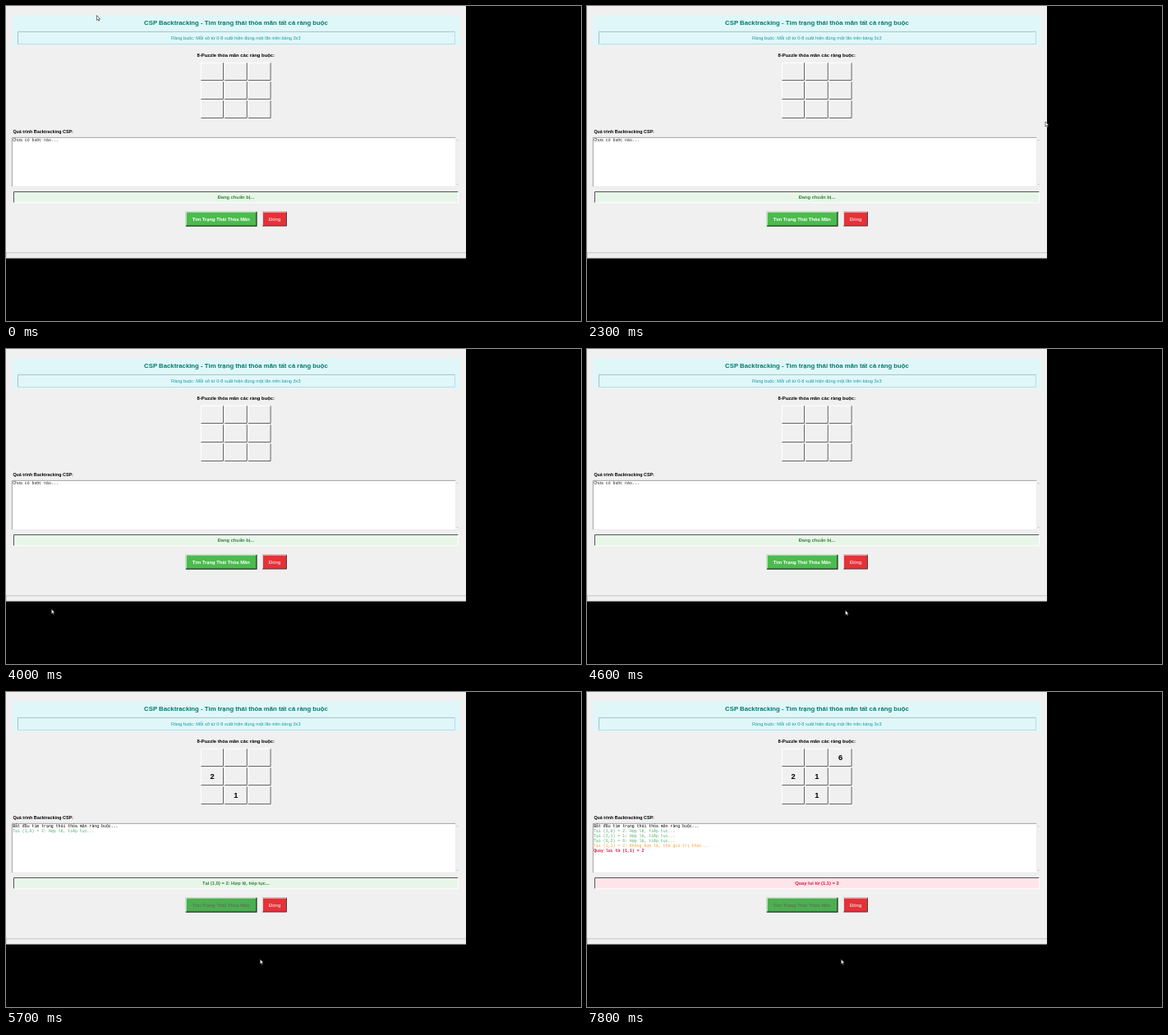
Recreate the animation shown at these times as an HTML page. Size 700 by 384 pixels, loop 8000 ms.

```html
<!DOCTYPE html>
<html lang="vi">
<head>
<meta charset="utf-8">
<style>
html, body { margin: 0; height: 100%; overflow: hidden; background: #000; }
svg { display: block; width: 100vw; height: 100vh; }
text { font-family: "Liberation Sans", Arial, sans-serif; white-space: pre; }
.bold { font-weight: bold; }
.mono { font-family: "Liberation Mono", "Courier New", monospace; }
.mid { text-anchor: middle; }
</style>
</head>
<body>
<svg id="stage" viewBox="0 0 700 384" preserveAspectRatio="none"></svg>
<script>
const LOOP = 8000, STEP = 100;
const stage = document.getElementById('stage');

function add(tag, attrs, content) {
  const el = document.createElementNS('http://www.w3.org/2000/svg', tag);
  for (const key in attrs) el.setAttribute(key, attrs[key]);
  if (content) el.textContent = content;
  stage.appendChild(el);
  return el;
}
const rect = (x, y, width, height, fill) => add('rect', { x, y, width, height, fill });
const line = (d, stroke, width = 1) => add('path', { d, stroke, 'stroke-width': width, fill: 'none' });
const label = (content, x, y, size, fill, cls) =>
  add('text', { x, y, 'font-size': size, fill, class: cls }, content);

// Box with one colour on its top and left edges, another on the bottom and right.
function bevel(x, y, w, h, fill, light, dark, width = 1) {
  const k = width / 2, r = x + w - k, b = y + h - k;
  return {
    body: rect(x, y, w, h, fill),
    light: line(`M${x + k} ${b}V${y + k}H${r}`, light, width),
    dark: line(`M${x + k} ${b}H${r}V${y + k}`, dark, width)
  };
}

// Window and header
rect(0, 0, 560, 307.5, '#f0f0f0');
rect(7.5, 11, 545.5, 37, '#e0f7fa');
bevel(14.2, 31, 532.6, 15.8, '#e0f7fa', '#8fa9ac', '#b4cdd0', 0.7);
label('CSP Backtracking - Tìm trạng thái thỏa mãn tất cả ràng buộc', 280, 22.7, 7.77, '#00796b', 'bold mid');
label('Ràng buộc: Mỗi số từ 0-8 xuất hiện đúng một lần trên bảng 3x3', 279.8, 41, 5.62, '#1799a3', 'mid');

// Board
label('8-Puzzle thỏa mãn các ràng buộc:', 279.8, 62.1, 5.86, '#000', 'bold mid');
const cells = [];
for (let i = 0; i < 9; i++) {
  const x = 237 + (i % 3) * 28.8, y = 68.8 + Math.floor(i / 3) * 23;
  bevel(x, y, 28, 22.2, '#f0f0f0', '#fff', '#666');
  cells.push(label('', x + 14, y + 14.4, 9.4, '#000', 'bold mid'));
}

// Log
label('Quá trình Backtracking CSP:', 8.4, 155, 5.38, '#000', 'bold');
bevel(7, 160, 541, 60.8, '#fff', '#8c8c8c', '#e3e3e3', 0.8);
rect(547.5, 160, 4.5, 60.8, '#f0f0f0');
line('M548.6 164.2l1-1l1 1M548.6 216.8l1 1l1-1', '#8a8a8a', 0.5);
const logRows = Array.from({ length: 6 }, (_, i) =>
  label('', 8.2, 165.4 + i * 5.87, 4.87, '#000', 'mono'));

// Status bar
const statusBox = bevel(9, 226, 542, 14.3, '#e8f5e9', '#555', '#fff');
const statusText = label('', 279.9, 235.1, 5.75, '#2e7d32', 'bold mid');

// Buttons
const find = bevel(218.5, 250.3, 87, 18.4, '#4cbb4f', '#e8f3e8', '#333', 1.2);
const findText = label('Tìm Trạng Thái Thỏa Mãn', 261.8, 261.6, 5.82, '#fff', 'bold mid');
bevel(312, 250.6, 30, 17.8, '#e53238', '#f6d5d5', '#444');
label('Đóng', 327.1, 261.5, 5.95, '#fff', 'mid');

// Lower frame
line('M0 300.8H560M0.3 300V307', '#b9b9b9', 0.8);
line('M0 307H560M559.6 301V307', '#d8d8d8', 0.6);

// Pointers
const arrow = add('path', {
  d: 'M0 0V5.9L1.4 4.7L2.3 6.7L3.2 6.3L2.3 4.3H4.1Z',
  fill: '#fff', stroke: '#222', 'stroke-width': 0.6
});
const beam = add('path', {
  d: 'M-1.4 -3.2H1.4M0 -3.2V3.2M-1.4 3.2H1.4',
  stroke: '#333', 'stroke-width': 0.7, fill: 'none'
});

// Pointer stops: time, x, y
const route = [
  [400, 110.5, 11.5], [500, 122, 16], [700, 212, 46], [900, 365, 84],
  [1100, 512, 116], [1200, 545.5, 124.5], [1300, 556, 132.5], [1700, 558, 141],
  [2500, 558, 141], [2700, 175, 255.5], [3000, 175, 255.5], [3200, 130, 290],
  [3400, 50, 345], [3600, 3, 378], [3700, 3, 378], [3800, 14, 360],
  [4000, 55.3, 317], [4200, 150, 310], [4400, 277, 316], [4500, 310, 318],
  [4600, 314.5, 318.5], [4900, 309.3, 325.8]
];

function pointerAt(t) {
  const next = route.findIndex(stop => stop[0] > t);
  if (next < 0) return route[route.length - 1].slice(1);
  if (next === 0) return route[0].slice(1);
  const [t0, x0, y0] = route[next - 1], [t1, x1, y1] = route[next];
  const k = (t - t0) / (t1 - t0);
  return [x0 + (x1 - x0) * k, y0 + (y1 - y0) * k];
}

const valid = (place, n) => `Tại (${place}) = ${n}: Hợp lệ, tiếp tục...`;
const GREEN = '#4caf6a', RED = '#d8163f';

// Search events: board, log and status change together.
const events = [
  { at: 0, status: 'Đang chuẩn bị...' },
  { at: 5200, cell: [3, 2], status: 'Đang tìm trạng thái thỏa mãn ràng buộc...',
    log: [['Bắt đầu tìm trạng thái thỏa mãn ràng buộc...', '#000']] },
  { at: 5700, cell: [7, 1], status: valid('1,0', 2), log: [[valid('1,0', 2), GREEN]] },
  { at: 6300, cell: [2, 6], status: valid('2,1', 1), log: [[valid('2,1', 1), GREEN]] },
  { at: 6800, cell: [4, 2], status: valid('0,2', 6), log: [[valid('0,2', 6), GREEN]] },
  { at: 7300, cell: [4, ''], status: 'Quay lui từ (1,1) = 2', failed: true,
    log: [['Tại (1,1) = 2: Không hợp lệ, thử giá trị khác...', '#ff9c33'],
          ['Quay lui từ (1,1) = 2', RED, true]] },
  { at: 7800, cell: [4, 1] }
];

function paintSearch(t) {
  const board = Array(9).fill('');
  let rows = [], status;
  for (const e of events.filter(e => e.at <= t)) {
    if (e.cell) board[e.cell[0]] = e.cell[1];
    if (e.log) rows = rows.concat(e.log);
    if (e.status) status = e;
  }
  if (!rows.length) rows = [['Chưa có bước nào...', '#222']];
  cells.forEach((cell, i) => { cell.textContent = board[i]; });
  logRows.forEach((row, i) => {
    const [content, color, bold] = rows[i] || ['', '#000'];
    row.textContent = content;
    row.setAttribute('fill', color);
    row.setAttribute('class', bold ? 'mono bold' : 'mono');
  });
  statusText.textContent = status.status;
  statusText.setAttribute('fill', status.failed ? RED : '#2e8535');
  statusBox.body.setAttribute('fill', status.failed ? '#ffe4ea' : '#e8f5e9');
}

function paintButton(t) {
  const pressed = t >= 5100 && t < 5200, disabled = t >= 5200;
  find.body.setAttribute('fill', pressed ? '#f0f0f0' : disabled ? '#4caf50' : '#4cbb4f');
  find.light.setAttribute('stroke', pressed ? '#555' : '#e8f3e8');
  find.dark.setAttribute('stroke', pressed ? '#fff' : '#333');
  findText.setAttribute('fill', pressed ? '#000' : disabled ? '#5f7560' : '#fff');
  findText.setAttribute('transform', pressed ? 'translate(.5 .5)' : '');
}

function paintPointer(t) {
  const [x, y] = pointerAt(t);
  const overText = t >= 2700 && t < 3100;
  arrow.setAttribute('visibility', overText ? 'hidden' : 'visible');
  beam.setAttribute('visibility', overText ? 'visible' : 'hidden');
  (overText ? beam : arrow).setAttribute('transform', `translate(${x} ${y})`);
}

function paint(now) {
  const t = Math.floor((now % LOOP) / STEP) * STEP;
  paintSearch(t);
  paintButton(t);
  paintPointer(t);
}

const start = performance.now();
function tick() {
  paint(performance.now() - start);
  requestAnimationFrame(tick);
}
tick();
</script>
</body>
</html>
```
